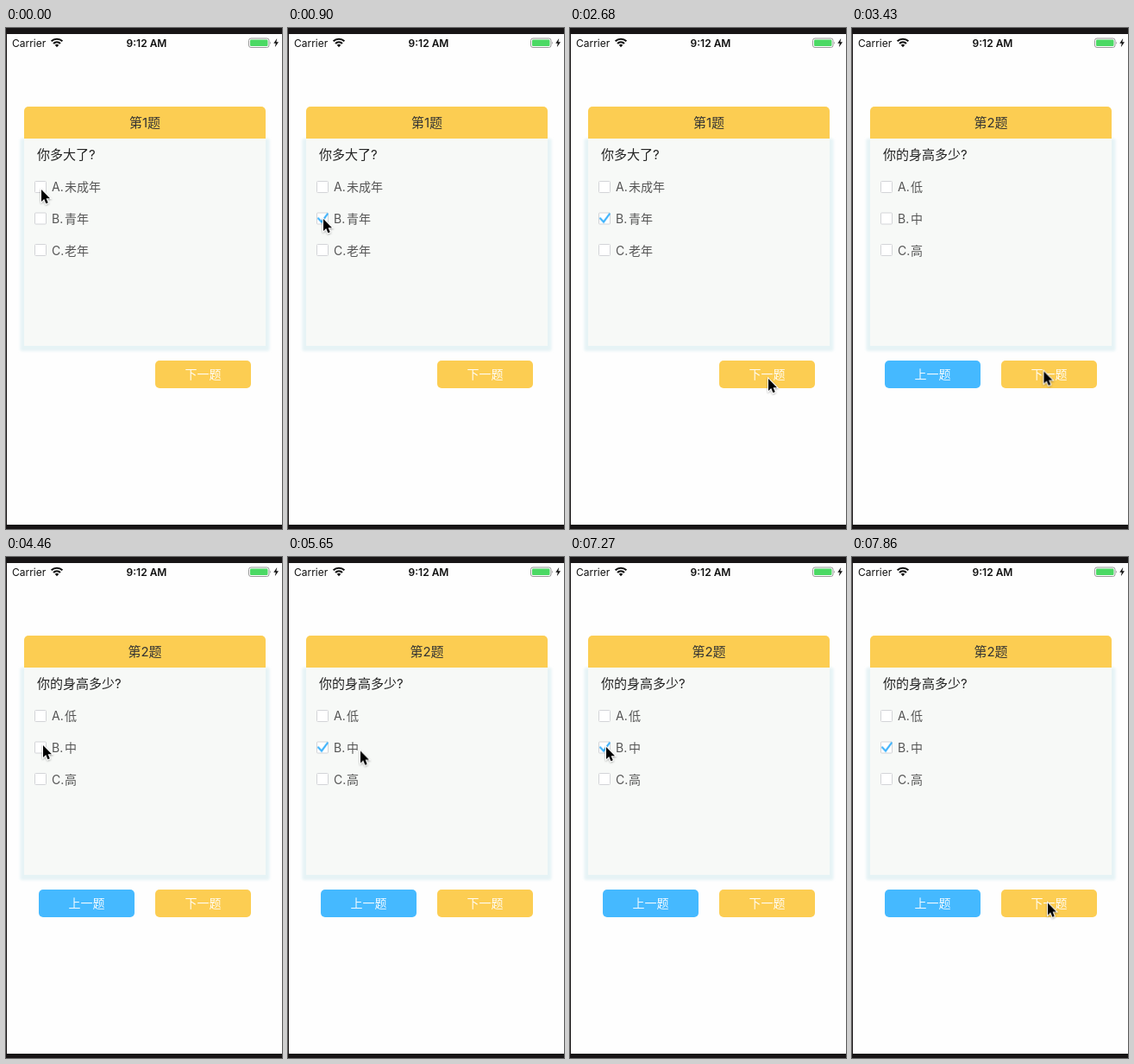
An HTML page for the animation above (8000 ms loop, 320 by 580 pixels).

```html
<!DOCTYPE html>
<html lang="zh-CN">
<head>
<meta charset="utf-8">
<title>Quiz</title>
<style>
html, body { margin: 0; width: 100%; height: 100%; overflow: hidden; background: #fff; }
svg { display: block; width: 320px; height: 580px; }
text { font-family: Inter, "Noto Sans CJK SC", "Noto Sans CJK", sans-serif; }
.status { font-size: 12px; fill: #111; }
.title { font-size: 15px; fill: #333; text-anchor: middle; }
.ask { font-size: 15px; fill: #222; }
.option { font-size: 14px; fill: #555; }
.button { font-size: 14px; fill: #fff; fill-opacity: .92; text-anchor: middle; font-weight: 300; }
.check { fill: none; stroke: #3db2fb; stroke-width: 2.1; }

.first, .second, .check, .cursor { animation: 8s step-end infinite; }
.first { animation-name: first; }
.second { animation-name: second; }
.check-a { animation-name: check-a; }
.check-b { animation-name: check-b; }
.cursor { animation-name: cursor; }

@keyframes first { 0% { opacity: 1 } 37.24%, 100% { opacity: 0 } }
@keyframes second { 0% { opacity: 0 } 37.24%, 100% { opacity: 1 } }
@keyframes check-a {
  0%, 11.24%, 90.86%, 100% { opacity: 0 }
  1.87%, 79.74% { opacity: 1 }
}
@keyframes check-b {
  0%, 37.24%, 79.74% { opacity: 0 }
  11.24%, 61.36%, 90.86%, 100% { opacity: 1 }
}
@keyframes cursor {
  0% { transform: translate(41px, 187px) }
  5.62% { transform: translate(41px, 207px) }
  7.49% { transform: translate(41px, 221px) }
  /* down past the button and back */
  16.74% { transform: translate(58px, 240px) }
  18.62% { transform: translate(136px, 325px) }
  20.49% { transform: translate(225px, 420px) }
  22.24% { transform: translate(280px, 475px) }
  24.12% { transform: translate(288px, 465.5px) }
  25.99% { transform: translate(225px, 414px) }
  29.74% { transform: translate(220px, 393px) }
  31.62% { transform: translate(225px, 400px) }
  33.49% { transform: translate(230px, 406px) }
  /* up to option B */
  42.87% { transform: translate(222.5px, 397.5px) }
  44.74% { transform: translate(190px, 360px) }
  46.62% { transform: translate(138px, 306px) }
  48.37% { transform: translate(92px, 260px) }
  50.24% { transform: translate(64px, 236px) }
  52.12% { transform: translate(52px, 226px) }
  53.87% { transform: translate(45px, 220px) }
  55.74% { transform: translate(43px, 218px) }
  /* to the button, then to option A */
  63.24% { transform: translate(84px, 258px) }
  65.12% { transform: translate(180px, 360px) }
  66.87% { transform: translate(228px, 405px) }
  68.74% { transform: translate(160px, 310px) }
  70.62% { transform: translate(84px, 224.5px) }
  72.49% { transform: translate(56px, 205px) }
  74.24% { transform: translate(46px, 195px) }
  76.12% { transform: translate(44px, 184px) }
  77.87% { transform: translate(43px, 180px) }
  /* to option B again, then the button */
  81.62% { transform: translate(45px, 206px) }
  83.49% { transform: translate(44px, 228px) }
  87.12% { transform: translate(42px, 220px) }
  92.74% { transform: translate(70px, 244px) }
  94.62% { transform: translate(142px, 320px) }
  96.37% { transform: translate(208px, 384px) }
  98.24%, 100% { transform: translate(227px, 400.5px) }
}
</style>
</head>
<body>
<svg viewBox="0 0 320 580">
  <defs>
    <filter id="soft" x="-10%" y="-10%" width="120%" height="120%"><feGaussianBlur stdDeviation="1.5"/></filter>
    <filter id="shade" x="-50%" y="-50%" width="200%" height="200%">
      <feDropShadow dx="0" dy="1" stdDeviation=".8" flood-opacity=".35"/>
    </filter>
    <rect id="box" x="33.5" width="13" height="13" rx="1" fill="#fff" stroke="#d3d4d8"/>
    <path id="tick" d="M34.5 6.2 39 11 46.3 1.2"/>
  </defs>

  <rect width="320" height="580" fill="#171415"/>
  <rect x="1" y="7" width="319" height="568" fill="#fefefe"/>

  <!-- status bar -->
  <text class="status" x="7" y="21.5">Carrier</text>
  <text class="status" x="163" y="21.5" text-anchor="middle" font-weight="600">9:12 AM</text>
  <g fill="none" stroke="#111" stroke-width="2.1">
    <path d="M52.6 15.3a9.2 9.2 0 0 1 12.8 0M55 18a5.8 5.8 0 0 1 8 0"/>
    <path d="M59 22.2 56.7 19.8a3.3 3.3 0 0 1 4.6 0Z" fill="#111" stroke="none"/>
  </g>
  <rect x="281.5" y="12" width="23.5" height="10.5" rx="2.5" fill="none" stroke="#999"/>
  <rect x="283" y="13.5" width="20.5" height="7.5" rx="1.2" fill="#4bd964"/>
  <path d="M306.2 15.5q1.6 1.7 0 3.6Z" fill="#888"/>
  <path d="M314.2 12 310.3 17.8H312.8L311.8 22.3 316 16.2H313.4Z" fill="#111"/>

  <!-- card -->
  <rect x="16.5" y="128" width="289" height="246" rx="2" fill="#e6f3f5" filter="url(#soft)"/>
  <rect x="21" y="128" width="280" height="240" fill="#f7f9f7"/>
  <path d="M21 128V96a5 5 0 0 1 5-5H296a5 5 0 0 1 5 5V128Z" fill="#fccd52"/>

  <use href="#box" y="177.5"/>
  <use href="#box" y="214"/>
  <use href="#box" y="250.5"/>
  <g class="option">
    <text x="53" y="189">A.</text>
    <text x="53" y="225.5">B.</text>
    <text x="53" y="262.5">C.</text>
  </g>

  <g class="first">
    <text class="title" x="161" y="115">第1题</text>
    <text class="ask" x="36" y="152">你多大了?</text>
    <g class="option">
      <text x="68" y="189">未成年</text>
      <text x="68" y="225.5">青年</text>
      <text x="68" y="262.5">老年</text>
    </g>
  </g>
  <g class="second">
    <text class="title" x="161" y="115">第2题</text>
    <text class="ask" x="36" y="152">你的身高多少?</text>
    <g class="option">
      <text x="68" y="189">低</text>
      <text x="68" y="225.5">中</text>
      <text x="68" y="262.5">高</text>
    </g>
    <rect x="38" y="385" width="111" height="32" rx="5" fill="#45b9ff"/>
    <text class="button" x="93.5" y="406">上一题</text>
  </g>

  <use class="check check-a" href="#tick" y="177"/>
  <use class="check check-b" href="#tick" y="213.5"/>

  <rect x="173" y="385" width="111" height="32" rx="5" fill="#fccd52"/>
  <text class="button" x="228.5" y="406">下一题</text>

  <g class="cursor">
    <path d="M0 0V14L3.2 11 5.4 16.2 7.8 15.2 5.6 10.2H10Z" stroke="#fff" stroke-width="1.8"
      paint-order="stroke" filter="url(#shade)"/>
  </g>
</svg>
</body>
</html>
```
